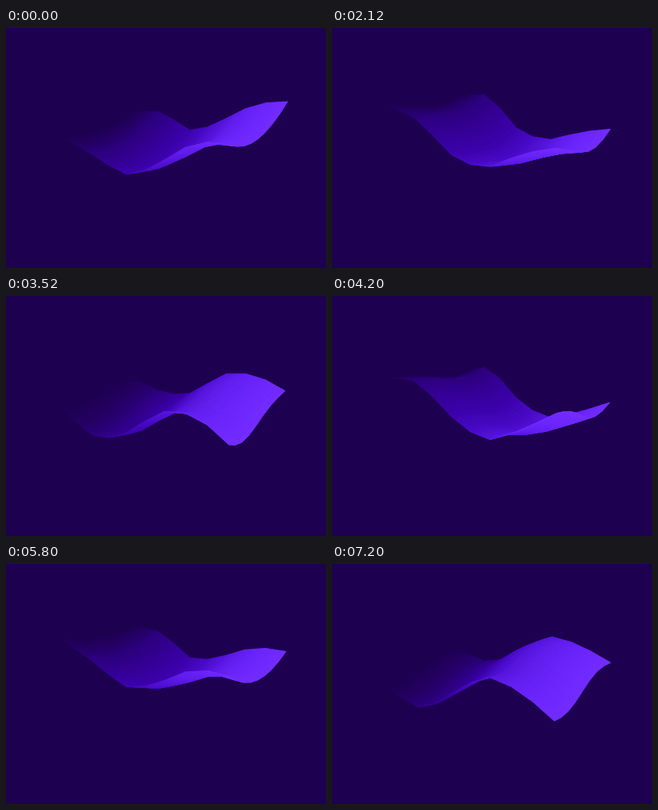
An HTML page with a canvas that plays this animation: 400 by 300 pixels, repeating every 7.24 s.

```html
<!DOCTYPE html>
<html lang="en">
<head>
<meta charset="utf-8">
<title>Waving sheet</title>
<style>
html, body { margin: 0; width: 100%; height: 100%; overflow: hidden; background: #1e0050; }
canvas { display: block; width: 400px; height: 300px; }
</style>
</head>
<body>
<canvas id="stage" width="400" height="300"></canvas>
<script>
const ctx = document.getElementById('stage').getContext('2d');
const LOOP = 7240, STEP = 40, PERIOD = 1930;
const COLS = 9, ROWS = 8, SLICES = 6;

// Each edge: rest height, cosine and sine amplitude at even spacing.
const front = {
  x0: 66, x1: 279,
  rest: [132, 145, 157, 166, 174, 180],
  cos: [-19, -4, 12, -9, -36, -36],
  sin: [-20, -36, -8, 22, 12, -18]
};
const back = {
  x0: 155, x1: 347,
  rest: [112, 111, 123, 127, 132, 135],
  cos: [-18, -14, 1, -12, -32, -35],
  sin: [5, -14, 7, 33, 29, 12]
};

// Slow drift of the four corners.
const driftTimes = [0, 1000, 1500, 2120, 3050, 3520, 4880, 5800, 7200];
const drift = {
  frontLeft: [22, 9, 0, -10, -4, -2, -5, -24, 0],
  frontRight: [2, 5, 16, 10, 1, 6, -9, -2, -6],
  backLeft: [12, 8, 0, -12, -4, 0, -8, -16, -5],
  backRight: [-8, 5, 9, 13, 9, 10, -4, 9, -4]
};

const ramp = [
  [0, 30, 0, 80], [0.1, 36, 0, 98], [0.2, 45, 0, 128], [0.35, 57, 0, 164],
  [0.5, 72, 10, 198], [0.7, 96, 29, 236], [0.85, 108, 38, 253], [1, 115, 44, 255]
];

const mix = (a, b, k) => a + (b - a) * k;

function spline(values, u) {
  const last = values.length - 1;
  const i = Math.min(last - 1, Math.floor(u * last));
  const k = u * last - i;
  const p1 = values[i], p2 = values[i + 1];
  const p0 = i > 0 ? values[i - 1] : 2 * p1 - p2;
  const p3 = i + 2 <= last ? values[i + 2] : 2 * p2 - p1;
  return p1 + 0.5 * k * (p2 - p0 + k * (2 * p0 - 5 * p1 + 4 * p2 - p3 + k * (3 * (p1 - p2) + p3 - p0)));
}

function driftAt(values, t) {
  let i = 0;
  while (i < driftTimes.length - 2 && t > driftTimes[i + 1]) i++;
  const k = Math.min(1, (t - driftTimes[i]) / (driftTimes[i + 1] - driftTimes[i]));
  return mix(values[i], values[i + 1], k * k * (3 - 2 * k));
}

function color(u) {
  let i = 0;
  while (i < ramp.length - 2 && u > ramp[i + 1][0]) i++;
  const a = ramp[i], b = ramp[i + 1];
  const k = (u - a[0]) / (b[0] - a[0]);
  return 'rgb(' + [1, 2, 3].map(c => Math.round(mix(a[c], b[c], k))).join(',') + ')';
}

function edgeHeight(edge, u, angle) {
  return spline(edge.rest, u) + spline(edge.cos, u) * Math.cos(angle) + spline(edge.sin, u) * Math.sin(angle);
}

function buildGrid(t) {
  const angle = 2 * Math.PI * t / PERIOD;
  const shift = {};
  for (const name in drift) shift[name] = driftAt(drift[name], t);
  const grid = [];
  for (let r = 0; r <= ROWS; r++) {
    const v = r / ROWS;
    const bulge = (2 + 18 * Math.cos(angle)) * 4 * v * (1 - v) - 7 * Math.sin(angle) * Math.sin(2 * Math.PI * v);
    const row = [];
    for (let c = 0; c <= COLS; c++) {
      const s = c / COLS, u = s * (0.78 + 0.22 * s);
      const near = edgeHeight(front, u, angle) + mix(shift.frontLeft, shift.frontRight, u);
      const far = edgeHeight(back, u, angle) + mix(shift.backLeft, shift.backRight, u);
      const y = mix(near, far, v) + bulge * mix(0.4, 1, u);
      const rest = mix(spline(front.rest, u), spline(back.rest, u), v);
      const x = mix(mix(front.x0, front.x1, u), mix(back.x0, back.x1, u), v);
      row.push({ x: x + (rest - y) * 0.12 * (x - 200) / 150, y, u });
    }
    grid.push(row);
  }
  return grid;
}

const between = (a, b, k) => [mix(a.x, b.x, k), mix(a.y, b.y, k)];

function draw(t) {
  const grid = buildGrid(t);
  ctx.fillStyle = '#1e0050';
  ctx.fillRect(0, 0, 400, 300);
  ctx.lineWidth = 1;
  ctx.lineJoin = 'round';
  // Far rows first, so nearer ones cover them.
  for (let r = ROWS - 1; r >= 0; r--) {
    const low = grid[r], high = grid[r + 1];
    for (let c = 0; c < COLS; c++) {
      for (let i = 0; i < SLICES; i++) {
        const k0 = i / SLICES, k1 = (i + 1) / SLICES;
        ctx.fillStyle = ctx.strokeStyle = color(mix(low[c].u, low[c + 1].u, (k0 + k1) / 2));
        ctx.beginPath();
        ctx.moveTo(...between(low[c], low[c + 1], k0));
        ctx.lineTo(...between(low[c], low[c + 1], k1));
        ctx.lineTo(...between(high[c], high[c + 1], k1));
        ctx.lineTo(...between(high[c], high[c + 1], k0));
        ctx.closePath();
        ctx.fill();
        ctx.stroke();
      }
    }
  }
}

const start = performance.now();
function tick() {
  const t = (performance.now() - start) % LOOP;
  draw(Math.floor(t / STEP) * STEP);
  requestAnimationFrame(tick);
}
tick();
</script>
</body>
</html>
```
